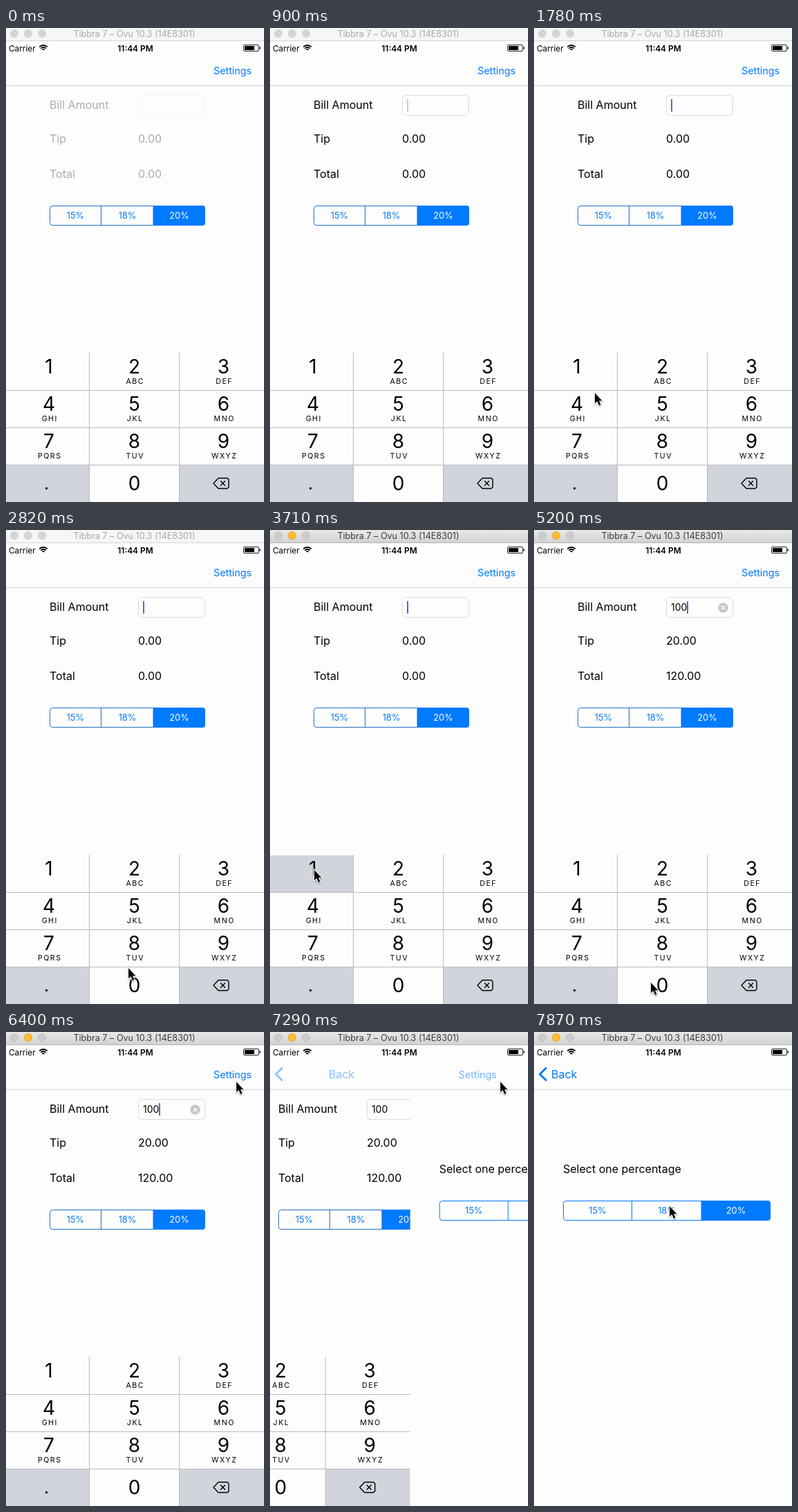
Recreate the animation shown at these times as an HTML page with a canvas. Size 373 by 686 pixels, loop 8000 ms.

```html
<!DOCTYPE html>
<html lang="en">
<head>
<meta charset="utf-8">
<title>Tip calculator</title>
<style>
  html, body { margin: 0; width: 100%; height: 100%; overflow: hidden; background: #fdfdfd; }
  canvas { display: block; width: 373px; height: 686px; }
</style>
</head>
<body>
<canvas id="stage"></canvas>
<script>
const W = 373, H = 686, LOOP = 8000, STEP = 148.6;
const BLUE = '#007aff', PAPER = '#fdfdfd', KEY_GRAY = '#d1d4db', LINE = '#b9babd';
const canvas = document.getElementById('stage');
const ctx = canvas.getContext('2d');
const dpr = window.devicePixelRatio || 1;
canvas.width = W * dpr;
canvas.height = H * dpr;

// Pointer tip: time, x, y
const POINTER = [
  [1190, 237, 469], [1930, 71, 535], [2230, 71, 535], [2823, 177, 634], [2972, 168, 647],
  [3410, 64, 492], [4012, 64, 492], [4450, 166, 648], [4900, 169, 655], [5350, 169, 655],
  [6385, 333, 72], [7285, 333, 72], [7870, 196, 252]
];
const INPUTS = [[-690, ''], [3860, '1'], [4900, '10'], [5200, '100']];
const PRESSES = [['1', 3710, 3860], ['0', 4600, 4900], ['0', 5050, 5200]];
const KEYS = [['1', ''], ['2', 'ABC'], ['3', 'DEF'], ['4', 'GHI'], ['5', 'JKL'], ['6', 'MNO'],
  ['7', 'PQRS'], ['8', 'TUV'], ['9', 'WXYZ'], ['.', ''], ['0', ''], ['', '']];
const COLUMNS = [[0, 120, 62], [121, 129, 185.5], [251, 122, 314.5]];

const clamp = v => Math.max(0, Math.min(1, v));
const smooth = v => v * v * (3 - 2 * v);
const reached = (t, at) => t >= at - 15;
const during = (t, from, to) => reached(t, from) && !reached(t, to);

function rect(x, y, w, h, color) {
  ctx.fillStyle = color;
  ctx.fillRect(x, y, w, h);
}

function text(str, x, y, size, color = '#000', align = 'left', weight = 400) {
  ctx.font = `${weight} ${size}px Inter, Roboto, sans-serif`;
  ctx.textAlign = align;
  ctx.fillStyle = color;
  ctx.fillText(str, x, y);
}

function path(points, close) {
  ctx.beginPath();
  points.forEach(([x, y]) => ctx.lineTo(x, y));
  if (close) ctx.closePath();
}

function stroke(color, width) {
  ctx.strokeStyle = color;
  ctx.lineWidth = width;
  ctx.stroke();
}

function disc(x, y, r, color) {
  ctx.beginPath();
  ctx.arc(x, y, r, 0, Math.PI * 2);
  ctx.fillStyle = color;
  ctx.fill();
}

function cross(x, y, r, color, width) {
  ctx.beginPath();
  ctx.moveTo(x - r, y - r); ctx.lineTo(x + r, y + r);
  ctx.moveTo(x + r, y - r); ctx.lineTo(x - r, y + r);
  stroke(color, width);
}

function group(alpha, dx, draw) {
  ctx.save();
  ctx.globalAlpha *= alpha;
  ctx.translate(dx, 0);
  draw();
  ctx.restore();
}

function titleBar(active) {
  const shade = ctx.createLinearGradient(0, 0, 0, 18);
  shade.addColorStop(0, active ? '#e9e9e9' : '#f6f6f6');
  shade.addColorStop(1, active ? '#d2d2d2' : '#f6f6f6');
  rect(0, 0, W, 18, shade);
  rect(0, 18, W, 1, active ? '#b4b4b4' : '#d4d4d4');
  [12, 32, 52].forEach((x, i) => {
    const lit = active && i === 1;
    disc(x, 8, 6, lit ? '#dfa023' : active ? '#b9b9b9' : '#d0d0d0');
    disc(x, 8, 5.3, lit ? '#fdbc2f' : active ? '#cdcdcd' : '#d5d5d5');
  });
  text('Tibbra 7 – Ovu 10.3 (14E8301)', 185.5, 13, 12.6, active ? '#3c3c3c' : '#a9a9a9', 'center');
}

function statusBar() {
  text('Carrier', 4, 33.5, 11.8);
  [9, 6, 3].forEach(r => {
    ctx.beginPath();
    ctx.arc(54, 33.2, r - 0.8, -Math.PI * 0.75, -Math.PI * 0.25);
    stroke('#000', 1.8);
  });
  text('11:44 PM', 187, 33.5, 11.9, '#000', 'center', 600);
  ctx.beginPath();
  ctx.roundRect(343.5, 24.5, 22, 9, 1.5);
  stroke('#222', 1);
  rect(345, 26, 14, 6, '#000');
  rect(366.5, 27.5, 1.5, 3, '#222');
}

function segments(x, y, w, border) {
  const cell = w / 3;
  ctx.beginPath();
  ctx.roundRect(x + cell * 2 - 0.5, y, cell + 0.5, 29, [0, 4, 4, 0]);
  ctx.fillStyle = BLUE;
  ctx.fill();
  ctx.beginPath();
  ctx.roundRect(x + 0.5, y + 0.5, cell * 2, 28, [4, 0, 0, 4]);
  stroke(border, 1);
  rect(Math.floor(x + cell - 0.5), y, 1, 29, border);
  ['15%', '18%', '20%'].forEach((label, i) =>
    text(label, x + cell * (i + 0.5), y + 19, 12.8, i === 2 ? '#fff' : BLUE, 'center'));
}

function caretAlpha(t, since) {
  const phase = Math.max(0, t - since - 90) % 1000 / 1000;
  return clamp((0.53 - phase) / 0.11);
}

function calculator(t) {
  const [since, bill] = INPUTS.findLast(([at]) => reached(t, at));
  const tip = bill * 0.2;
  group(1 - 0.68 * (1 - clamp(t / 1000)) ** 2, 0, () => {
    text('Bill Amount', 63, 116.5, 16);
    text('Tip', 63, 165.5, 16);
    text('Total', 63, 216.5, 16);
    text(tip.toFixed(2), 191, 165.5, 16);
    text((bill * 1 + tip).toFixed(2), 191, 216.5, 16);
    ctx.beginPath();
    ctx.roundRect(191.5, 97.5, 96, 29, 5);
    stroke('#dcdcdc', 1);
    text(bill, 198, 117, 14);
    if (bill) {
      disc(273.5, 112.5, 7.2, '#c6c6ca');
      cross(273.5, 112.5, 2.7, '#fff', 1.3);
    }
    const caretX = Math.round(198 + ctx.measureText(bill).width);
    group(caretAlpha(t, since), 0, () => rect(caretX, 103, 2, 18, '#5068e0'));
  });
  segments(63, 257, 225, '#2470c0');
}

function keypad(t) {
  KEYS.forEach(([digit, letters], i) => {
    const [x, w, center] = COLUMNS[i % 3];
    const y = 470 + Math.floor(i / 3) * 54;
    const corner = i === 9 || i === 11;
    const pressed = PRESSES.some(([key, from, to]) => key === digit && during(t, from, to));
    rect(x, y + 1, w, 53, corner || pressed ? KEY_GRAY : PAPER);
    if (digit === '.') text(digit, 58.5, 668, 26, '#000', 'center');
    else text(digit, center, y + (i > 8 ? 199 - 0.5 - 162 + 162 - 199 + 37.5 - 0 : 30), 28, '#000', 'center');
    ctx.letterSpacing = '1.5px';
    text(letters, center + 1.2, y + 45, 10.6, '#000', 'center');
    ctx.letterSpacing = '0px';
  });
  rect(120, 470, 1, 216, LINE);
  rect(250, 470, 1, 216, LINE);
  [524, 578, 632].forEach(y => rect(0, y, W, 1, LINE));
  path([[300, 659], [307, 651.5], [320, 651.5], [322, 653.5], [322, 664.5], [320, 666.5], [307, 666.5]], true);
  ctx.lineJoin = 'round';
  stroke('#000', 1.4);
  cross(313.5, 659, 3.4, '#000', 1.4);
}

function settingsPage() {
  rect(0, 84, W, H - 84, PAPER);
  text('Select one percentage', 42, 203.5, 16);
  segments(42, 244, 300, BLUE);
}

function navBar(t, push) {
  rect(0, 83, W, 1, '#cfcfcf');
  const dimmed = during(t, 6550, 6840) ? 0.25 : 1;
  group(dimmed * (1 - push), -60 * push, () => text('Settings', 300, 66.5, 14.3, BLUE));
  group(push, 0, () => {
    path([[18, 51.5], [8.5, 61], [18, 70.5]]);
    ctx.lineJoin = 'miter';
    stroke(BLUE, 2.8);
    text('Back', 25 + 110 * (1 - push), 67, 16, BLUE);
  });
}

function pointer(t) {
  if (!reached(t, POINTER[0][0])) return;
  const next = POINTER.findIndex(([at]) => at > t);
  const b = POINTER[next < 0 ? POINTER.length - 1 : next];
  const a = POINTER[next < 0 ? POINTER.length - 1 : Math.max(0, next - 1)];
  const k = a === b ? 1 : smooth((t - a[0]) / (b[0] - a[0]));
  ctx.save();
  ctx.translate(a[1] + (b[1] - a[1]) * k, a[2] + (b[2] - a[2]) * k);
  path([[0, 0], [0, 15], [3.4, 12], [6, 18], [8.6, 17], [6, 11.2], [10.5, 11.2]], true);
  ctx.lineJoin = 'miter';
  ctx.shadowColor = 'rgba(0,0,0,.35)';
  ctx.shadowBlur = 2;
  ctx.shadowOffsetY = 1;
  stroke('#fff', 2);
  ctx.shadowColor = 'transparent';
  ctx.fillStyle = '#000';
  ctx.fill();
  ctx.restore();
}

function draw(t) {
  const push = reached(t, 7290) ? 1 - (1 - clamp((t - 7150) / 500)) ** 2 : 0;
  ctx.setTransform(dpr, 0, 0, dpr, 0, 0);
  rect(0, 0, W, H, PAPER);
  if (push < 1) {
    group(1, -0.3 * W * push, () => calculator(t));
    group(1, -W * push, () => keypad(t));
  }
  if (push > 0) group(1, W * (1 - push), settingsPage);
  navBar(t, push);
  statusBar();
  titleBar(reached(t, 3710));
  pointer(t);
}

function frame() {
  const step = Math.floor((performance.now() % LOOP + 7) / STEP);
  draw(Math.min(step, 53) * STEP);
  requestAnimationFrame(frame);
}
frame();
</script>
</body>
</html>
```
